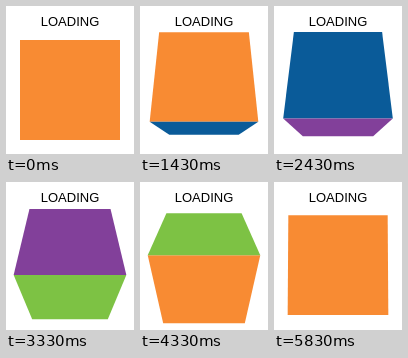
Animation of 128 by 148 pixels, one loop 5930 ms. Source, as an HTML page with a canvas:

```html
<!DOCTYPE html>
<html lang="en">
<head>
<meta charset="utf-8">
<title>Loading</title>
<style>
  html, body { margin: 0; width: 100%; height: 100%; overflow: hidden; background: #fff; }
  canvas { display: block; }
</style>
</head>
<body>
<canvas id="stage" width="128" height="148"></canvas>
<script>
const ctx = document.getElementById('stage').getContext('2d');
const LOOP = 5930, STEP = 100, FIRST = 30;
const CX = 64, CY = 84, HALF = 50, DEPTH = 180;
const COLORS = ['#f88b33', '#0a5b99', '#82409a', '#7dc244'];

// Cube angle in degrees: a small wind-up, one full turn, an overshoot.
const KEYS = [
  [-100, 1.4], [0, 0], [250, -7.5], [500, -11], [870, -7.2], [1130, 1.2],
  [1430, 20.5], [1930, 61], [2430, 113.5], [3330, 218.5], [4330, 322.7],
  [4730, 350.6], [5130, 368], [5430, 371.3], [5830, 361.4], [5930, 360], [6180, 352.5]
];

const slope = (p, q) => (q[1] - p[1]) / (q[0] - p[0]);

function tangent(i) {
  const [p, k, n] = KEYS.slice(i - 1, i + 2);
  const before = k[0] - p[0], after = n[0] - k[0];
  return (slope(p, k) * after + slope(k, n) * before) / (before + after);
}

function angleAt(t) {
  let i = 1;
  while (t >= KEYS[i + 1][0]) i++;
  const [t0, a0] = KEYS[i], [t1, a1] = KEYS[i + 1];
  const h = t1 - t0, u = (t - t0) / h, v = 1 - u;
  return a0 * v * v * (1 + 2 * u) + a1 * u * u * (3 - 2 * u)
    + h * u * v * (tangent(i) * v - tangent(i + 1) * u);
}

// Projects a horizontal cube edge to its height and half width.
function edge(y, angle) {
  const s = Math.sin(angle), c = Math.cos(angle);
  const scale = DEPTH / (DEPTH + HALF - y * s - HALF * c);
  return { y: CY + (y * c - HALF * s) * scale, w: HALF * scale };
}

function drawFace(color, angle) {
  const top = edge(-HALF, angle), bottom = edge(HALF, angle);
  if (bottom.y <= top.y) return;
  ctx.fillStyle = color;
  ctx.beginPath();
  ctx.moveTo(CX - top.w, top.y);
  ctx.lineTo(CX + top.w, top.y);
  ctx.lineTo(CX + bottom.w, bottom.y);
  ctx.lineTo(CX - bottom.w, bottom.y);
  ctx.fill();
}

function draw(t) {
  ctx.fillStyle = '#fff';
  ctx.fillRect(0, 0, 128, 148);
  ctx.fillStyle = '#000';
  ctx.font = '13px "Liberation Sans", Arial, sans-serif';
  ctx.textAlign = 'center';
  ctx.fillText('LOADING', CX, 20);
  const angle = angleAt(t);
  COLORS.forEach((color, i) => drawFace(color, (angle - 90 * i) * Math.PI / 180));
}

const start = performance.now();
function tick() {
  const t = (performance.now() - start) % LOOP;
  draw(t < FIRST ? 0 : FIRST + Math.floor((t - FIRST) / STEP) * STEP);
  requestAnimationFrame(tick);
}
tick();
</script>
</body>
</html>
```
